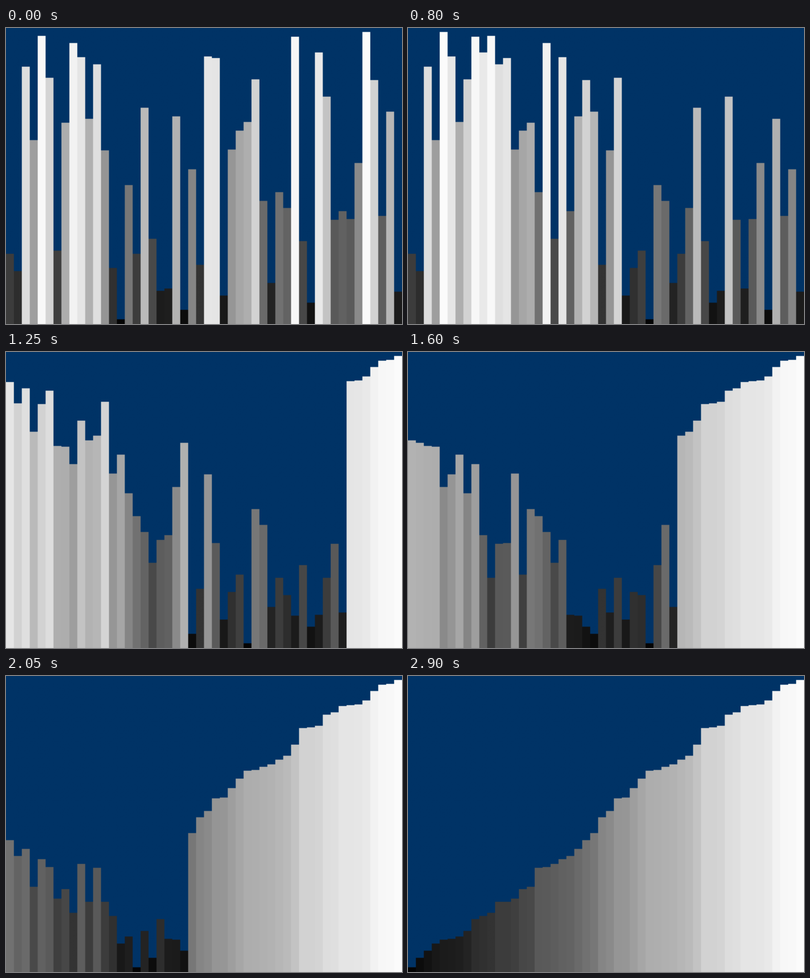
These frames come from a looping animation (740x555 px, 3050 ms). A matplotlib script:

```python
import math

import matplotlib.pyplot as plt
import numpy as np
from matplotlib.animation import FuncAnimation

STAGE_W, STAGE_H = 740, 555
W, H, BAR = 500, 375, 10  # drawing canvas, scaled up smoothly to the stage
FRAMES, INTERVAL = 61, 50
STEPS_PER_FRAME, LEAD = 1.25, 1.5
BACKGROUND = np.array([0, 0x33, 0x66]) / 255

# The unsorted input: distance of each bar's top from the canvas top.
TOPS = [
    286, 308, 49, 142, 10, 63, 282, 120, 19, 37, 115, 46, 155, 304, 369, 199, 286,
    101, 267, 333, 330, 112, 357, 179, 300, 36, 38, 339, 154, 130, 119, 65, 219, 323,
    208, 228, 11, 270, 348, 31, 87, 243, 232, 242, 171, 5, 66, 238, 106, 334,
]


def sift_down(heap, root, size):
    while (child := 2 * root + 1) < size:
        if child + 1 < size and heap[child + 1] > heap[child]:
            child += 1
        if heap[child] <= heap[root]:
            return
        heap[root], heap[child] = heap[child], heap[root]
        root = child


def heap_sort_states(values):
    """List the array before sorting and after every sift."""
    heap = list(values)
    states = [heap[:]]
    for root in reversed(range(len(heap) // 2)):
        sift_down(heap, root, len(heap))
        states.append(heap[:])
    for end in range(len(heap) - 1, 0, -1):
        heap[0], heap[end] = heap[end], heap[0]
        sift_down(heap, 0, end)
        states.append(heap[:])
    return states


def paint(heights):
    """Draw bars whose grey level follows their height."""
    columns = np.repeat(heights, BAR)
    rows = np.arange(H)[:, None]
    inside = rows >= H - columns
    return np.where(inside[..., None], (columns / H)[None, :, None], BACKGROUND)


states = heap_sort_states(H - top for top in TOPS)

fig = plt.figure(figsize=(STAGE_W / 100, STAGE_H / 100), dpi=100, facecolor=BACKGROUND)
ax = fig.add_axes([0, 0, 1, 1])
ax.axis("off")
image = ax.imshow(paint(states[0]), aspect="auto", interpolation="bilinear")


def update(frame):
    step = min(math.floor(STEPS_PER_FRAME * frame + LEAD), len(states) - 1)
    image.set_data(paint(states[step]))
    return [image]


anim = FuncAnimation(fig, update, frames=FRAMES, interval=INTERVAL,
                     init_func=lambda: update(0), repeat=True, repeat_delay=0)
plt.show()
```
